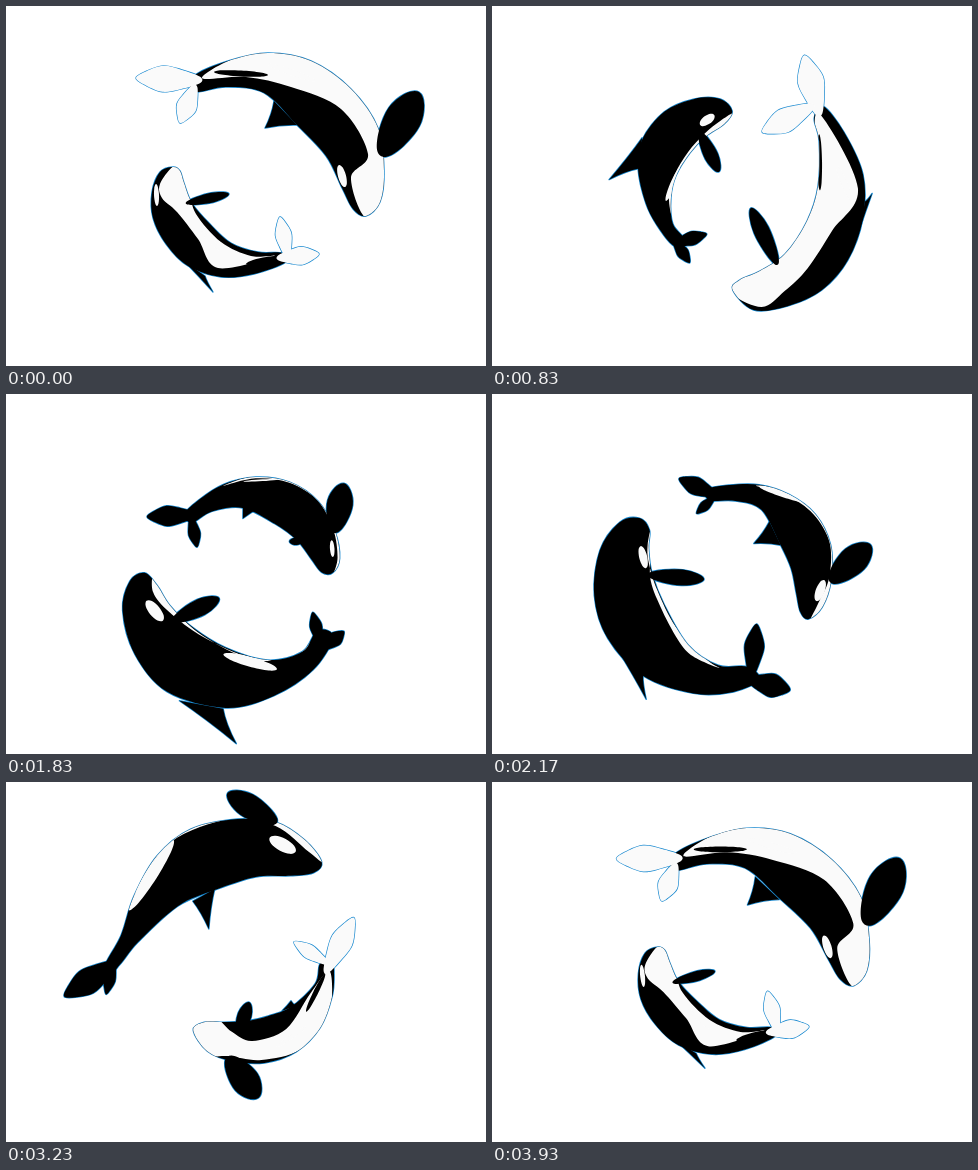
Write an HTML page with a canvas that moves like this. It is 480 px wide and 360 px high and loops after 3960 ms.

```html
<!DOCTYPE html>
<html lang="en">
<head>
<meta charset="utf-8">
<title>Circling orcas</title>
<style>
html, body { margin: 0; width: 100%; height: 100%; overflow: hidden; background: #fff; }
canvas { display: block; width: 480px; height: 360px; }
</style>
</head>
<body>
<canvas id="stage" width="480" height="360"></canvas>
<script>
const ctx = document.getElementById('stage').getContext('2d');
const LOOP = 3960, STEP = 100 / 3, CX = 245, CY = 183;
const BLACK = '#000', WHITE = '#fafafa', BLUE = '#1587cf';

// Bodies run nose, outer side, tail, inner side. Leaves are base, tip, half width.
const big = [
  { t: 0,
    body: [360,210, 374,196, 378,165, 372,122, 345,83, 305,55, 262,47, 222,55, 188,70, 188,86, 220,81, 258,87, 290,118, 320,150, 336,182, 347,203],
    belly: [360,212, 382,190, 384,130, 345,76, 285,46, 235,50, 196,72, 240,71, 285,81, 335,103, 362,148, 345,172],
    dorsal: [268,95, 259,122, 291,119],
    finOut: [376,148, 413,86, 18], finIn: [335,150, 325,140, 0],
    flukeOut: [194,74, 130,72, 13], flukeIn: [189,80, 174,117, 10],
    eye: [333,159, 339,181, 4], saddle: [262,58, 310,75, 3], streak: [208,66, 262,69, 3] },
  { t: 830,
    body: [241,284, 262,304, 296,300, 330,284, 356,254, 371,212, 371,168, 352,126, 331,100, 322,112, 327,135, 326,180, 315,215, 293,248, 268,265, 248,274],
    belly: [238,286, 270,301, 293,285, 316,262, 340,225, 366,182, 328,108, 322,135, 322,185, 308,225, 285,250, 245,270],
    dorsal: [373,195, 380,187, 368,222],
    finOut: [300,290, 310,292, 0], finIn: [285,257, 259,202, 8],
    flukeOut: [327,108, 312,49, 13], flukeIn: [320,100, 270,126, 12],
    eye: [270,301, 285,300, 0], saddle: [345,160, 360,195, 3], streak: [327,128, 328,184, 2.5] },
  { t: 1470,
    body: [157,233, 149,246, 155,272, 185,304, 235,323, 298,303, 328,270, 350,222, 350,176, 334,174, 342,200, 322,233, 285,254, 240,258, 205,253, 177,242],
    belly: [157,230, 163,251, 195,260, 250,262, 310,246, 344,205, 340,174, 334,205, 310,238, 262,252, 215,250, 180,238],
    dorsal: [298,304, 328,335, 250,325],
    finOut: [190,290, 200,285, 0], finIn: [203,262, 228,225, 9],
    flukeOut: [350,192, 346,172, 4], flukeIn: [343,192, 335,173, 3.5],
    eye: [163,264, 187,274, 6], saddle: [262,266, 315,252, 7], streak: [322,232, 288,256, 3] },
  { t: 2170,
    body: [148,123, 128,127, 108,155, 102,200, 115,243, 150,281, 200,299, 240,298, 266,286, 254,273, 225,271, 195,250, 172,210, 160,178, 157,153, 158,135],
    belly: [160,132, 156,150, 157,168, 165,195, 183,232, 212,264, 226,274, 200,262, 185,245, 168,212, 158,182, 161,150],
    dorsal: [150,280, 153,304, 127,258],
    finOut: [120,165, 125,160, 0], finIn: [157,180, 212,185, 8],
    flukeOut: [256,286, 297,297, 12], flukeIn: [258,282, 264,230, 10],
    eye: [149,151, 154,173, 4], saddle: [187,238, 213,264, 2], streak: [225,275, 210,262, 0] },
  { t: 2570, cut: true,
    body: [190,68, 165,71, 137,87, 115,120, 101,165, 106,212, 128,250, 158,275, 182,285, 190,277, 172,250, 159,212, 159,172, 170,138, 185,115, 198,90],
    dorsal: [120,215, 125,210, 118,195],
    finOut: [140,92, 87,109, 13], finIn: [170,124, 188,156, 7],
    flukeOut: [186,278, 197,333, 14], flukeIn: [184,282, 221,243, 10],
    eye: [194,85, 190,100, 0], saddle: [165,170, 172,150, 0], streak: [180,265, 185,270, 0],
    out: { eye: [150,80, 165,72, 0], saddle: [105,200, 101,150, 0] } },
  { t: 3230,
    body: [316,80, 299,58, 270,40, 232,37, 185,47, 151,74, 128,114, 115,153, 99,183, 111,185, 132,160, 172,124, 209,108, 250,95, 285,94, 308,91],
    belly: [317,80, 303,56, 270,36, 225,32, 170,52, 135,95, 118,128, 130,110, 165,60, 225,37, 270,44, 303,70],
    dorsal: [187,119, 203,147, 209,107],
    finOut: [270,40, 222,11, 12], finIn: [255,90, 250,85, 0],
    flukeOut: [111,180, 58,214, 13], flukeIn: [108,178, 100,212, 6],
    eye: [264,56, 290,70, 6.5], saddle: [123,128, 168,58, 6], streak: [115,165, 120,150, 0] }
];

const small = [
  { t: 0,
    body: [167,161, 154,166, 146,186, 147,212, 160,238, 182,260, 215,271, 248,268, 280,256, 276,247, 252,246, 225,237, 203,217, 186,197, 178,177, 174,165],
    belly: [168,160, 154,178, 156,192, 171,206, 192,233, 212,262, 268,250, 245,250, 215,236, 190,208, 184,185, 180,165],
    dorsal: [199,270, 207,286, 178,255],
    finOut: [160,220, 165,225, 0], finIn: [181,197, 223,188, 5],
    flukeOut: [272,252, 313,248, 9], flukeIn: [282,252, 274,211, 8],
    eye: [150,178, 151,200, 2.5], saddle: [195,225, 215,245, 2], streak: [240,258, 275,251, 3] },
  { t: 830,
    body: [240,105, 228,93, 202,93, 172,106, 150,134, 146,163, 154,198, 166,221, 182,240, 194,235, 181,218, 179,192, 184,170, 198,147, 213,131, 232,118],
    belly: [242,107, 228,115, 212,128, 196,146, 183,168, 177,190, 180,210, 184,195, 190,172, 202,150, 216,136, 236,121],
    dorsal: [146,163, 117,174, 150,132],
    finOut: [180,120, 185,125, 0], finIn: [208,127, 227,166, 7],
    flukeOut: [182,234, 198,257, 6], flukeIn: [182,238, 215,228, 7],
    eye: [208,119, 222,109, 4.5], saddle: [174,195, 188,162, 3], streak: [182,215, 181,205, 0] },
  { t: 1470, cut: true,
    body: [308,134, 309,118, 290,96, 262,81, 228,80, 195,94, 171,120, 160,148, 157,166, 168,168, 176,150, 203,130, 235,122, 262,124, 282,132, 297,139],
    dorsal: [185,115, 190,118, 200,105],
    finOut: [287,98, 267,66, 10], finIn: [270,123, 249,145, 7],
    flukeOut: [165,160, 126,187, 10], flukeIn: [160,164, 195,184, 7],
    eye: [290,125, 298,130, 0], saddle: [180,145, 200,130, 0], streak: [170,155, 180,140, 0],
    out: { eye: [303,122, 298,112, 0], saddle: [200,92, 230,80, 0] } },
  { t: 2170,
    body: [316,226, 330,214, 339,188, 339,152, 324,121, 298,101, 268,91, 238,91, 216,95, 218,106, 244,107, 270,116, 288,150, 299,175, 304,200, 308,219],
    belly: [318,228, 336,212, 343,180, 342,145, 322,115, 296,97, 265,92, 296,102, 322,121, 338,150, 337,185, 326,210],
    dorsal: [278,128, 262,150, 289,152],
    finOut: [339,188, 379,152, 14], finIn: [305,180, 310,175, 0],
    flukeOut: [225,101, 188,84, 9], flukeIn: [224,102, 205,119, 5],
    eye: [324,208, 332,187, 4.5], saddle: [268,93, 314,109, 2.5], streak: [235,95, 250,95, 0] },
  { t: 2570,
    body: [273,262, 298,259, 326,237, 339,205, 342,172, 331,138, 306,113, 278,104, 254,89, 251,97, 275,108, 297,130, 297,168, 293,192, 288,220, 276,244],
    belly: [272,264, 300,264, 332,240, 343,208, 346,170, 335,138, 305,112, 333,142, 341,172, 337,206, 314,243, 288,250],
    dorsal: [299,165, 270,170, 293,187],
    finOut: [314,241, 355,232, 11], finIn: [300,220, 303,215, 0],
    flukeOut: [266,99, 251,89, 3], flukeIn: [264,99, 251,96, 3],
    eye: [286,245, 302,232, 4.5], saddle: [310,128, 338,187, 7], streak: [285,108, 290,112, 0] },
  { t: 3230,
    body: [187,248, 201,269, 226,279, 258,281, 290,270, 314,246, 326,215, 328,192, 326,180, 314,182, 309,202, 285,225, 262,234, 240,239, 218,240, 198,240],
    belly: [184,248, 200,272, 222,274, 255,278, 294,268, 322,238, 324,190, 304,212, 280,247, 246,259, 226,250, 208,236],
    dorsal: [290,224, 285,219, 276,229],
    finOut: [222,276, 252,316, 14], finIn: [232,252, 243,220, 7],
    flukeOut: [320,190, 348,136, 11], flukeIn: [322,182, 288,160, 7],
    eye: [210,270, 215,272, 0], saddle: [270,265, 300,245, 2], streak: [319,192, 300,230, 2.5] }
];

const LEAF = {
  fin: [[0, .3], [.25, .8], [.6, 1], [.88, .62], [1, 0]],
  fluke: [[0, .25], [.3, .75], [.58, 1], [.84, .55], [1, 0]],
  oval: [[0, 0], [.14, .7], [.5, 1], [.86, .7], [1, 0]]
};

function turn(p, angle) {
  const c = Math.cos(angle), s = Math.sin(angle), r = p.slice();
  for (let i = 0; i + 1 < p.length; i += 2) {
    const x = p[i] - CX, y = p[i + 1] - CY;
    r[i] = CX + x * c - y * s;
    r[i + 1] = CY + x * s + y * c;
  }
  return r;
}

const angleAt = t => 2 * Math.PI * t / LOOP;

// A belly folded flat onto one side of the body.
function folded(body, side) {
  return [0, 1, 2, 3, 4, 5, 6, 5, 4, 3, 2, 1].flatMap(i => {
    const j = (side * i + 16) % 16;
    return [body[2 * j], body[2 * j + 1]];
  });
}

// Store every pose in the frame that turns with the whales.
function prepare(poses) {
  for (const p of poses) {
    if (p.cut) {
      p.belly = folded(p.body, -1);
      p.out.belly = folded(p.body, 1);
    }
    for (const set of [p, p.out || {}])
      for (const k in set)
        if (Array.isArray(set[k])) set[k] = turn(set[k], -angleAt(p.t));
  }
  return poses;
}

function sample(poses, key, t) {
  const n = poses.length;
  let k = n - 1;
  while (poses[k].t > t) k--;
  const at = i => poses[(i + n) % n];
  const time = i => at(i).t + LOOP * Math.floor(i / n);
  const leave = p => p.out && p.out[key];
  const a = leave(at(k)) || at(k)[key], b = at(k + 1)[key];
  const before = leave(at(k)) ? a : leave(at(k - 1)) || at(k - 1)[key];
  const after = leave(at(k + 1)) ? b : at(k + 2)[key];
  const [t0, t1, t2, t3] = [-1, 0, 1, 2].map(i => time(k + i));
  const d = t2 - t1, u = (t - t1) / d, v = 1 - u;
  return turn(a.map((p, i) => {
    const m1 = (b[i] - before[i]) / (t2 - t0) * d;
    const m2 = (after[i] - p) / (t3 - t1) * d;
    return p * (1 + 2 * u) * v * v + m1 * u * v * v + b[i] * u * u * (3 - 2 * u) - m2 * u * u * v;
  }), angleAt(t));
}

function smooth(p) {
  const path = new Path2D(), n = p.length;
  const g = i => p[(i + n) % n];
  path.moveTo(p[0], p[1]);
  for (let i = 0; i < n; i += 2)
    path.bezierCurveTo(
      g(i) + (g(i + 2) - g(i - 2)) / 6, g(i + 1) + (g(i + 3) - g(i - 1)) / 6,
      g(i + 2) - (g(i + 4) - g(i)) / 6, g(i + 3) - (g(i + 5) - g(i + 1)) / 6,
      g(i + 2), g(i + 3));
  path.closePath();
  return path;
}

function leaf([x, y, tx, ty, w], profile) {
  if (w < .4) return new Path2D();
  const dx = tx - x, dy = ty - y, len = Math.hypot(dx, dy) || 1;
  const spot = ([u, v], s) => [x + dx * u - s * v * w * dy / len, y + dy * u + s * v * w * dx / len];
  const back = profile.slice(0, -1).reverse().filter(q => q[0] || q[1]);
  return smooth([...profile.flatMap(q => spot(q, 1)), ...back.flatMap(q => spot(q, -1))]);
}

function dorsal([ax, ay, tx, ty, bx, by]) {
  const path = new Path2D(), mx = (ax + bx) / 2, my = (ay + by) / 2;
  const mid = (p, q, m) => (p + q) / 2 * .85 + m * .15;
  path.moveTo(ax, ay);
  path.quadraticCurveTo(mid(ax, tx, mx), mid(ay, ty, my), tx, ty);
  path.quadraticCurveTo(mid(bx, tx, mx), mid(by, ty, my), bx, by);
  path.closePath();
  return path;
}

function fill(path, color) {
  ctx.fillStyle = color;
  ctx.fill(path);
}

function drawWhale(whale, t) {
  const get = key => sample(whale.poses, key, t);
  const shape = (key, kind) => leaf(get(key), LEAF[kind]);
  const pale = end => t > whale.paleFrom || t < end ? WHITE : BLACK;
  const body = smooth(get('body')), back = dorsal(get('dorsal'));
  const fins = [shape('finOut', 'fin'), shape('finIn', 'fin')];
  const flukes = [shape('flukeOut', 'fluke'), shape('flukeIn', 'fluke')];

  ctx.strokeStyle = BLUE;
  ctx.lineWidth = 1.4;
  ctx.lineJoin = 'round';
  for (const p of [back, body, ...fins, ...flukes]) ctx.stroke(p);

  fill(back, BLACK);
  fill(body, BLACK);
  ctx.save();
  ctx.clip(body);
  fill(smooth(get('belly')), WHITE);
  fill(shape('streak', 'oval'), BLACK);
  fill(shape('saddle', 'oval'), WHITE);
  fill(shape('eye', 'oval'), WHITE);
  ctx.restore();
  flukes.forEach((p, i) => fill(p, pale(whale.paleTo[i])));
  fins.forEach(p => fill(p, BLACK));
}

const whales = [
  { poses: prepare(big), paleFrom: 3600, paleTo: [1300, 1500] },
  { poses: prepare(small), paleFrom: 2720, paleTo: [330, 400] }
];

// The motion advances thirty times a second, on ten-millisecond marks.
function stepTime(t) {
  let n = Math.floor((t + 5) / STEP);
  if (Math.round(n * STEP / 10) * 10 > t) n--;
  return Math.min(n, 118) * LOOP / 119;
}

const start = performance.now();
function frame(now) {
  const t = stepTime(Math.max(0, now - start) % LOOP);
  ctx.fillStyle = '#fff';
  ctx.fillRect(0, 0, 480, 360);
  for (const w of whales) drawWhale(w, t);
  requestAnimationFrame(frame);
}
frame(start);
</script>
</body>
</html>
```
